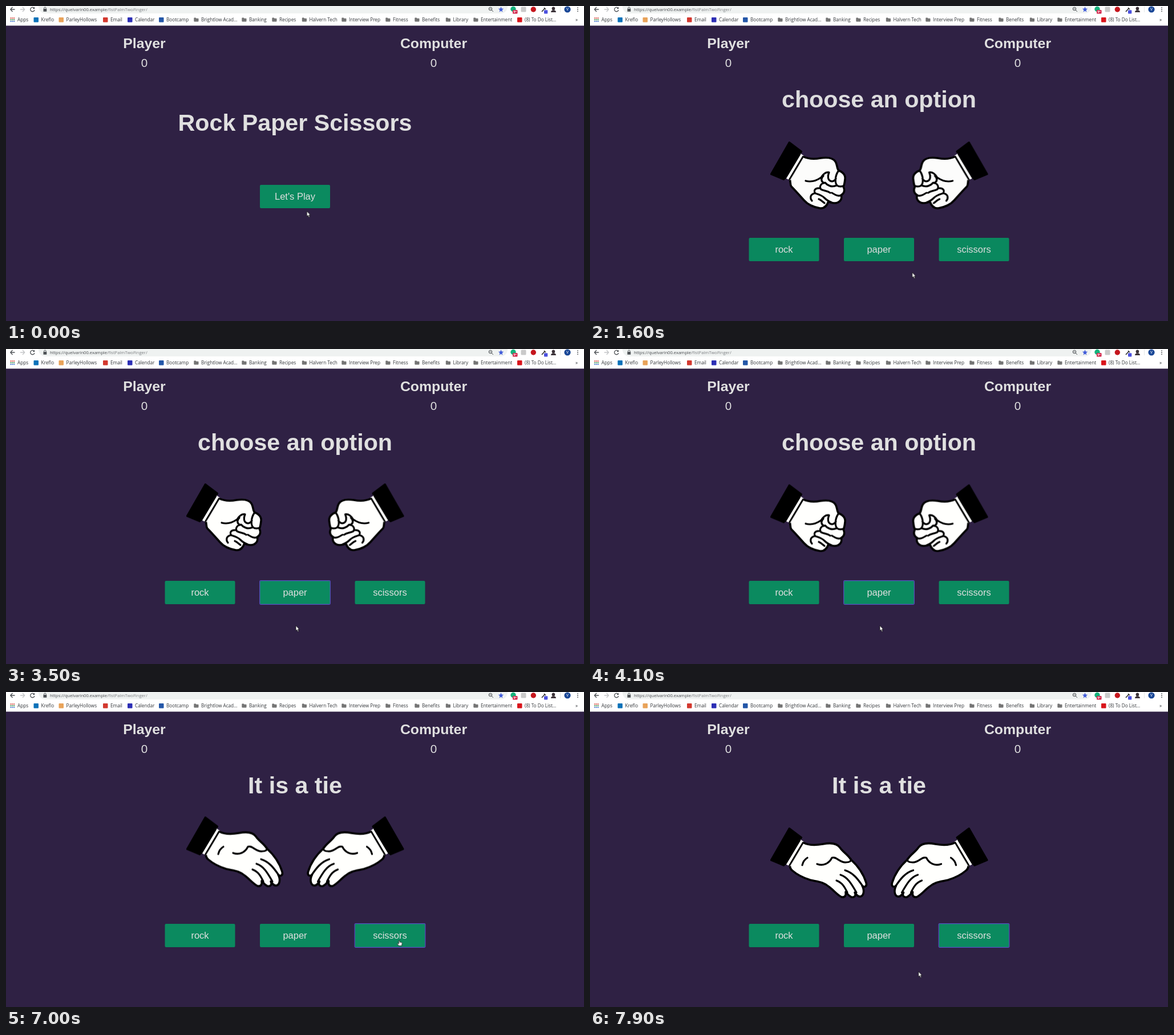
An HTML page for the animation above (8000 ms loop, 1013x553 px).

```html
<!DOCTYPE html>
<html lang="en">
<head>
<meta charset="utf-8">
<title>Rock Paper Scissors</title>
<style>
  html, body { margin: 0; width: 100%; height: 100%; overflow: hidden; background: #2f2144; }
  svg { display: block; width: 100%; height: 100%; }
  .page text { font-family: "Liberation Sans", Arial, sans-serif; fill: #e0e0e0; text-anchor: middle; }
  .h1 { font-size: 41.2px; font-weight: bold; }
  .h2 { font-size: 24.8px; font-weight: bold; }
  .score { font-size: 20.6px; }
  .label { font-size: 16.5px; }
  .bar text { font-family: "Open Sans", "Noto Sans", sans-serif; font-size: 8.2px; fill: #33363a; }
  .bar .url { font-size: 7.6px; fill: #45484c; }
  .bar .badge { font-size: 5px; font-weight: bold; fill: #fff; text-anchor: middle; }
  .bar .user { font-size: 6.5px; fill: #fff; text-anchor: middle; }
  .line { fill: none; stroke: #000; stroke-width: 3.2; stroke-linecap: round; stroke-linejoin: round; }
  .skin { fill: #fffffd; stroke: #000; stroke-width: 3.6; stroke-linejoin: round; }
  .ring { fill: none; stroke: #5a4cc4; stroke-width: 1.2; }
</style>
</head>
<body>
<svg viewBox="0 0 1013 553" preserveAspectRatio="none">
  <defs>
    <g id="sleeve">
      <path d="M349.5 240 L370 255.5 L339.5 304 L318 295 Z" stroke="#000" stroke-width="4" stroke-linejoin="round"/>
      <path d="M369 259 L375 263 L351 306 L342 302 Z" fill="#fffffd"/>
      <path class="line" style="stroke-width:2.6" d="M368 260 L342.5 302.5 M373.5 264 L349.5 304.5"/>
    </g>
    <g id="rock">
      <path class="skin" d="M373 264 C383 269 394 269 404 267 C417 265 426 267 430 273 C434 279 432 285 436 289
        C443 291 448 297 447 304 C446 311 446 314 444 317 C447 323 446 329 440 332 C443 339 437 346 429 346
        C424 346 421 345 418 343 C415 351 410 356 403 355 C391 353 382 349 375 341 C367 332 360 324 353 317
        C350 313 352 309 350 304 Z"/>
      <path class="line" d="M378 307 C389 310 398 306 405 301 C410 293 414 291 419 292 C416 299 417 305 421 307 C425 309 429 307 431 303
        M435 290 C429 299 429 311 433 315 C437 318 441 317 444 316
        M409 298 C404 303 405 308 410 311 M432 315 C424 319 416 315 412 310 C405 311 401 317 405 322 C411 325 416 324 421 328
        M441 332 C434 335 429 331 424 328
        M402 320 C395 319 391 324 395 329 C401 331 406 332 411 337 C414 340 418 343 424 345
        M393 329 C386 331 385 337 389 342 M401 339 C406 341 408 344 411 346"/>
      <use href="#sleeve"/>
    </g>
    <g id="paper">
      <path class="skin" d="M373 264 C384 270 397 269 408 267 C423 264 433 266 438 273 C443 281 452 285 457 294
        C468 304 479 318 484 335 C486 341 481 344 477 340 C482 350 479 358 474 359 C470 360 467 356 464 352
        C467 358 463 361 458 360 C453 358 451 354 448 351 C449 357 447 361 441 360 C433 356 427 348 419 342
        C409 333 398 333 386 330 C373 326 362 320 354 313 C350 310 351 307 350 304 Z"/>
      <path class="line" d="M398 302 C409 306 419 301 424 291 C432 288 437 300 449 299 C455 299 458 297 457 293
        M381 291 C376 294 373 299 372 304
        M447 313 C461 317 470 329 478 341 M439 321 C452 325 459 338 467 352 M432 331 C443 335 447 344 451 352"/>
      <use href="#sleeve"/>
    </g>
    <g id="folder" fill="#757575">
      <path d="M0 1.2 Q0 .4 .8 .4 H3.2 L4.2 1.5 H7.4 Q8.2 1.5 8.2 2.3 V6.4 Q8.2 7.2 7.4 7.2 H.8 Q0 7.2 0 6.4 Z"/>
    </g>
  </defs>

  <rect width="1013" height="553" fill="#2f2144"/>

  <g class="bar">
    <rect width="1013" height="34.5" fill="#fff"/>
    <rect x="57" y="-12" width="822" height="25" rx="12" fill="#eff2f1"/>
    <g fill="none" stroke="#4c5054" stroke-width="1.3">
      <path d="M15.5 6 H8 M11.5 2 L7.8 6 L11.5 10"/>
      <path d="M25 6 H32.5 M29 2 L32.7 6 L29 10" stroke="#c3c5c7"/>
      <path d="M49.2 3.6 A3.7 3.7 0 1 0 50 7"/>
      <path d="M66.7 5 V3.7 A1.7 1.7 0 0 1 70.1 3.7 V5" stroke-width="1"/>
      <circle cx="849" cy="5" r="2.8" stroke-width="1"/>
      <path d="M851 7 L854 10 M847.6 5 H850.4" stroke-width="1"/>
    </g>
    <path d="M50.2 1.6 V5 H46.8 Z M65.5 5 H71.3 V9.7 H65.5 Z" fill="#4c5054"/>
    <text class="url" x="77" y="8.5">https://quelvarin00.example<tspan fill="#7b7e81">/fistPalmTwoFinger/</tspan></text>
    <path d="M867.5 1.3 L868.8 4.6 L872.2 4.8 L869.5 7 L870.4 10.4 L867.5 8.5 L864.6 10.4 L865.5 7 L862.8 4.8 L866.2 4.6 Z" fill="#3f5bd9"/>
    <circle cx="889" cy="5.5" r="4.7" fill="#16b27c"/>
    <rect x="888" y="7" width="8.5" height="6.5" rx="1" fill="#d2254a"/>
    <text class="badge" x="892.3" y="12">9+</text>
    <rect x="902.5" y="1.5" width="9" height="9" rx="1.5" fill="#c9c9c9"/>
    <circle cx="924.3" cy="6" r="4.7" fill="#c5161d"/>
    <path d="M939 10 L944 4.5 M943 3 L946 6" stroke="#333" stroke-width="1.7"/>
    <rect x="943" y="7.3" width="6.3" height="6.3" rx="1" fill="#4b50de"/>
    <path d="M955 11 Q955 7.2 959.5 7.2 Q964 7.2 964 11 Z M956.6 4.4 a2.8 3 0 1 0 5.6 0 a2.8 3 0 1 0 -5.6 0" fill="#3b3238"/>
    <path d="M971.5 1 V11" stroke="#d9dbdd" stroke-width=".7"/>
    <circle cx="984" cy="6" r="5.6" fill="#194796"/>
    <text class="user" x="984" y="8.3">V</text>
    <g fill="#4c5054"><circle cx="1002" cy="2.8" r=".9"/><circle cx="1002" cy="6" r=".9"/><circle cx="1002" cy="9.2" r=".9"/></g>
    <g id="marks"></g>
    <text x="998" y="26.8">»</text>
  </g>

  <g class="page">
    <text class="h2" x="242.5" y="74">Player</text>
    <text class="score" x="242.4" y="107.3">0</text>
    <text class="h2" x="749.5" y="74">Computer</text>
    <text class="score" x="749.4" y="107.3">0</text>
    <g id="intro"><text class="h1" x="506.5" y="219">Rock Paper Scissors</text></g>
    <g id="match">
      <text class="h1" id="ask" x="506.5" y="178.2">choose an option</text>
      <text class="h1" id="tie" x="506.5" y="178.2">It is a tie</text>
      <g id="hands">
        <g id="fists"><use href="#rock"/><use href="#rock" transform="translate(1013.5) scale(-1 1)"/></g>
        <g id="palms"><use href="#paper"/><use href="#paper" transform="translate(1013.5) scale(-1 1)"/></g>
      </g>
    </g>
  </g>

  <g id="cursor" stroke="#111" stroke-width=".8" stroke-linejoin="round" fill="#fff">
    <path id="arrow" d="M0 0 V9 L2 7.2 L3.5 10.6 L5.1 9.9 L3.6 6.7 H6.2 Z"/>
    <path id="pointer" d="M-.9 .8 Q0 -.4 .9 .8 V3.4 L4.4 4.1 Q5.2 4.4 5 5.6 L4.2 9.8 H-.9 L-3.4 6.4 Q-3.4 5 -2 5.5 L-.9 6.4 Z"/>
  </g>
</svg>

<script>
const LOOP = 8000;
const $ = id => document.getElementById(id);

function add(parent, tag, attrs, text) {
  const el = document.createElementNS("http://www.w3.org/2000/svg", tag);
  for (const k in attrs) el.setAttribute(k, attrs[k]);
  if (text) el.textContent = text;
  parent.appendChild(el);
  return el;
}

// Bookmarks: text x, label, icon colour (a folder when there is none)
const marks = $("marks");
[
  [61.5, "Kreflo", "#0b72b9"], [105.5, "ParleyHollows", "#e9a35a"], [183, "Email", "#d3392f"],
  [226, "Calendar", "#2d2fb5"], [281, "Bootcamp", "#2457a8"], [342, "Brightlow Acad…"],
  [426, "Banking"], [479, "Recipes"], [531.5, "Halvern Tech"], [601, "Interview Prep"],
  [678, "Fitness"], [729, "Benefits"], [783.5, "Library"], [832, "Entertainment"],
  [909, "(8) To Do List…", "#d9141b"]
].forEach(([x, label, color]) => {
  if (color) add(marks, "rect", { x: x - 13, y: 20, width: 8.5, height: 8.5, rx: 1, fill: color });
  else add(marks, "use", { href: "#folder", x: x - 12.7, y: 20.2 });
  add(marks, "text", { x, y: 26.8 }, label);
});
add(marks, "text", { x: 20, y: 26.8 }, "Apps");
["#d8483c", "#3f8f57", "#4a7bd0"].forEach((fill, row) => {
  for (let col = 0; col < 3; col++)
    add(marks, "rect", { x: 7.5 + col * 2.9, y: 20.3 + row * 2.9, width: 1.9, height: 1.9, fill });
});

// Returns the focus ring of the new button
function button(parent, x, y, label) {
  add(parent, "rect", { x, y, width: 123, height: 41, rx: 2, fill: "#0b8a5f" });
  add(parent, "text", { x: x + 61.5, y: y + 26, class: "label" }, label);
  return add(parent, "rect", { x: x - .3, y: y - .3, width: 123.6, height: 41.6, rx: 1.5, class: "ring" });
}
const playRing = button($("intro"), 445, 314, "Let's Play");
button($("match"), 278.5, 407, "rock").remove();
const paperRing = button($("match"), 445, 407, "paper");
const scissorsRing = button($("match"), 611.5, 407, "scissors");

// steps: [ms, value]; the first and last values are held to the ends of the loop
function play(el, prop, steps, easing = "linear") {
  const all = [[0, steps[0][1]], ...steps, [LOOP, steps[steps.length - 1][1]]];
  el.animate(all.map(([t, v]) => ({ offset: t / LOOP, [prop]: v, easing })),
    { duration: LOOP, iterations: Infinity });
}
const show = (el, from, to = LOOP) =>
  play(el, "opacity", [[0, from ? 0 : 1], [from, 1], [to, to < LOOP ? 0 : 1]], "step-end");

const START = 665, PICK = 2560, REVEAL = 4992, REPICK = 6910;
play($("intro"), "opacity", [[START, 1], [START + 500, 0]], "ease");
play($("match"), "opacity", [[START + 500, 0], [START + 1000, 1]], "ease");
show($("ask"), 0, REVEAL);
show($("fists"), 0, REVEAL);
show($("tie"), REVEAL);
show($("palms"), REVEAL);
show(playRing, START - 5);
show(paperRing, PICK, REPICK);
show(scissorsRing, REPICK);

// Hands bob four times after the first pick, twice before the loop ends
const first = [0, .15, .25, .35, .5, .65, .75, .85, 1].map((p, i) => [PICK + p * 2050, i % 2 * -40]);
const second = [6923, 7196, 7378, 7560, 7890].map((t, i) => [t, i % 2 * -40]);
play($("hands"), "transform",
  [...first, ...second].map(([t, y]) => [t, `translate(0px, ${y}px)`]), "ease");

play($("cursor"), "transform", [
  [200, 527.3, 360.3], [400, 525, 338.4], [1000, 525, 338.4], [1500, 564.7, 467.7],
  [1930, 564.7, 467.7], [2200, 296, 437], [2450, 500, 437], [2600, 500, 437],
  [2800, 507, 485], [2900, 508, 485.6], [5300, 508, 485.6], [5600, 500, 440],
  [5900, 400, 435], [6000, 400, 435], [6300, 502, 435.5], [6400, 502, 435.5],
  [6600, 638, 431], [6700, 638, 431], [6800, 689.3, 435.7], [7050, 689.3, 435.7],
  [7350, 575.7, 490.8]
].map(([t, x, y]) => [t, `translate(${x}px, ${y}px)`]));

// Times when the cursor enters and leaves a button
const hover = [250, 1065, 2105, 2330, 2382, 2646, 5547, 5765, 5894, 6006, 6132, 6497, 6560, 7118];
const swap = start => [[0, start], ...hover.map((t, i) => [t, i % 2 ? start : 1 - start])];
play($("pointer"), "opacity", swap(0), "step-end");
play($("arrow"), "opacity", swap(1), "step-end");
</script>
</body>
</html>
```
